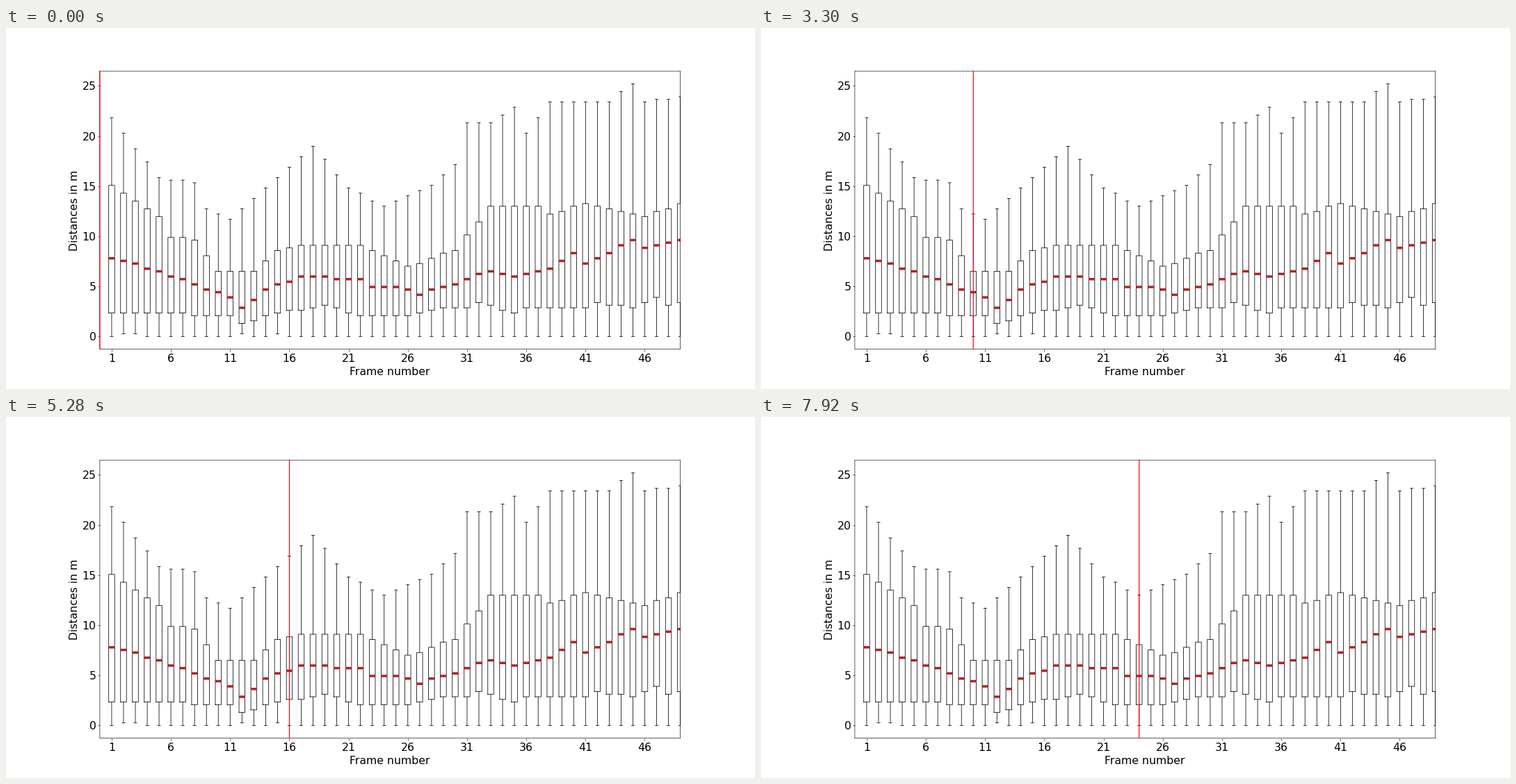
These frames come from a looping animation (1077x520 px, 8 s). A matplotlib script:

```python
import matplotlib.pyplot as plt
import numpy as np
from matplotlib.animation import FuncAnimation

WIDTH, HEIGHT, DPI = 1077, 520, 56
LOOP_MS, TICK_MS, STEP_MS = 8000, 40, 330
UNIT = 0.26   # metres per distance bin
SHIFT = 0.28  # pixels the axes sit right of and above the default place
COLUMNS = np.arange(1, 50)


def curve(*points):
    """Distances per column from (column, bin) key points, in whole bins."""
    cols, bins = zip(*points)
    return UNIT * np.round(np.interp(COLUMNS, cols, bins))


top = curve((1, 84), (5, 61), (8, 59), (9, 49), (11, 45), (18, 73), (21, 57),
            (24, 50), (28, 58), (30, 66), (31, 82), (33, 82), (35, 88),
            (36, 78), (38, 90), (43, 90), (45, 97), (46, 90), (49, 92))
q3 = curve((1, 58), (5, 46), (6, 38), (8, 37), (10, 25), (13, 25), (15, 33),
           (17, 35), (22, 35), (26, 27), (30, 33), (33, 50), (37, 50),
           (38, 47), (41, 51), (46, 46), (49, 51))
median = curve((1, 30), (5, 25), (8, 20), (11, 15), (12, 11), (14, 18),
               (17, 23), (22, 22), (23, 19), (25, 19), (27, 16), (33, 25),
               (35, 23), (38, 26), (40, 32), (41, 28), (45, 37), (46, 34),
               (49, 37))
q1 = curve((1, 9.4), (11, 8), (12, 5), (14, 8), (19, 12), (22, 8), (26, 7.5),
           (29, 11), (31, 11), (32, 13), (35, 9), (36, 11), (41, 11),
           (42, 13), (45, 11), (47, 15), (48, 12), (49, 13))
bottom = UNIT * np.isin(COLUMNS, (2, 3, 12, 15))

plt.rcParams.update({"font.family": "DejaVu Sans", "font.size": 20.2,
                     "path.snap": False})

# The small margin keeps the pixel size from being truncated
fig, ax = plt.subplots(
    figsize=((WIDTH + 0.01) / DPI, (HEIGHT + 0.01) / DPI), dpi=DPI)
fig.patch.set_facecolor("white")
dx, dy = SHIFT / WIDTH, SHIFT / HEIGHT
fig.subplots_adjust(left=0.125 + dx, right=0.9 + dx,
                    bottom=0.11 + dy, top=0.88 + dy)

stats = [dict(whislo=lo, q1=a, med=m, q3=b, whishi=hi)
         for lo, a, m, b, hi in zip(bottom, q1, median, q3, top)]
thin = dict(color="black", linewidth=1.0)
ax.bxp(stats, positions=COLUMNS, widths=0.5, showfliers=False,
       manage_ticks=False, boxprops=thin, whiskerprops=thin, capprops=thin,
       medianprops=dict(color="firebrick", linewidth=4.5,
                        solid_capstyle="butt"))

peak = top.max()
ax.set_xlim(0, COLUMNS[-1])
ax.set_ylim(-0.05 * peak, 1.05 * peak)
ax.set_xticks(range(1, 50, 5))
ax.set_yticks(range(0, 26, 5))
ax.tick_params(axis="x", pad=5.2)
ax.set_xlabel("Frame number", labelpad=5.3)
ax.set_ylabel("Distances in m")

cursor = ax.axvline(0, color="red", linewidth=1.5, zorder=5, clip_on=False)


def update(i):
    # Each step falls in the tick that contains its moment
    last_ms = (i + 1) * TICK_MS - 1
    step = last_ms // STEP_MS
    cursor.set_xdata([step, step])
    return (cursor,)


anim = FuncAnimation(fig, update, frames=LOOP_MS // TICK_MS,
                     interval=TICK_MS, repeat=True, repeat_delay=0)
plt.show()
```
